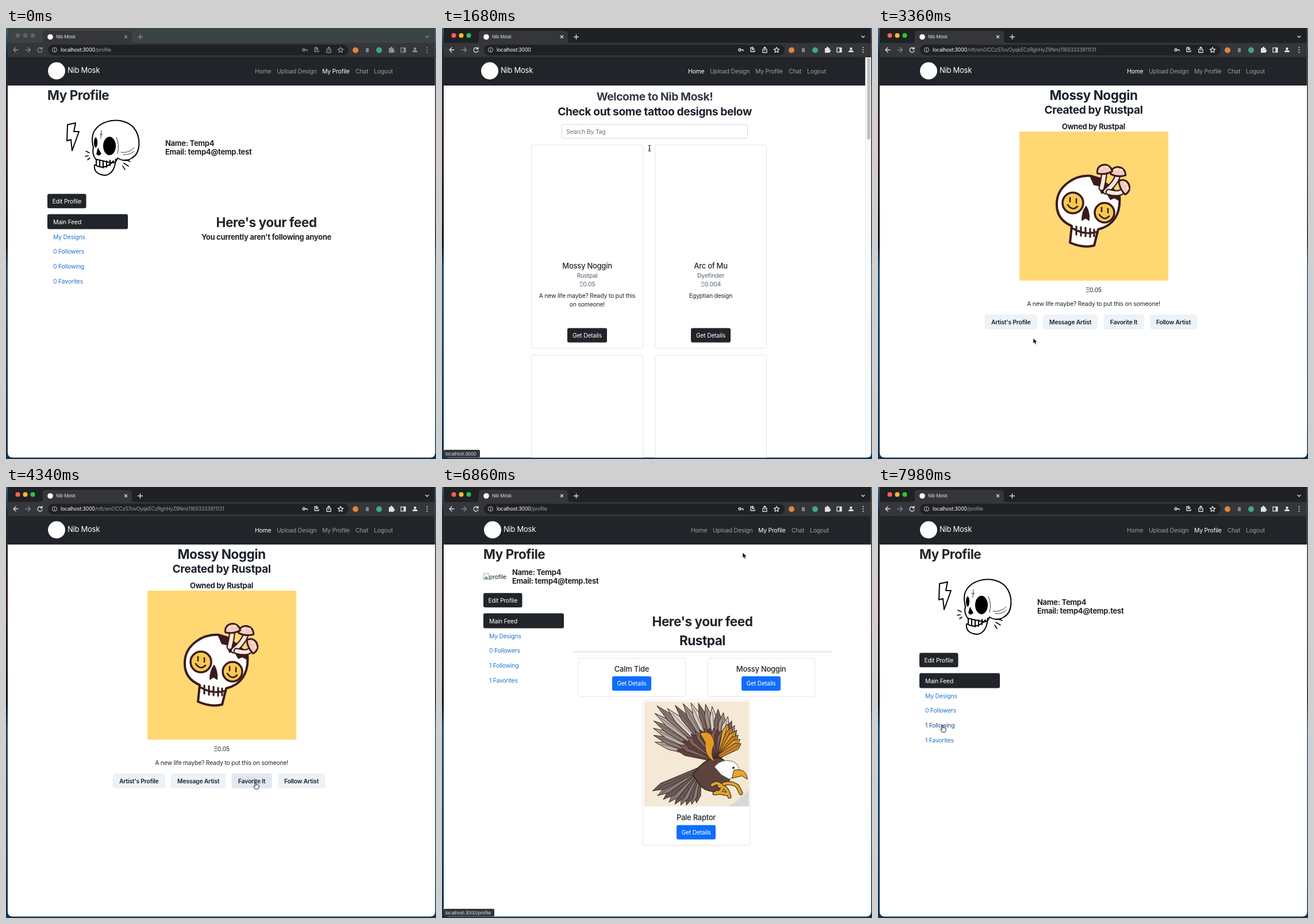
Animation, 748 px wide and 749 px high, one loop 8000 ms. Source, as an HTML page:

```html
<!DOCTYPE html>
<html lang="en">
<head>
<meta charset="utf-8">
<title>Nib Mosk</title>
<style>
  html, body { margin: 0; width: 100%; height: 100%; overflow: hidden; background: #fff; }
  svg { display: block; width: 748px; height: 749px; font-family: Inter, "Open Sans", sans-serif; }
  text { letter-spacing: -.02em; white-space: pre; }
</style>
</head>
<body>
<svg id="stage" viewBox="0 0 748 749"></svg>
<script>
const LOOP = 8000, STEP = 70;
const BRAND = 'Nib Mosk', ARTIST = 'Rustpal', DESIGN = 'Mossy Noggin';
const DARK = '#212529', INK = '#1a202c', BLUE = '#0d6efd';
const H1 = 22.5, H2 = 19.2, H3 = 12.9, BODY = 10.4;
const stage = document.getElementById('stage');

// Drawing helpers
const text = (x, y, size, str, fill = DARK, weight = 400, anchor = 'start') =>
  `<text x="${x}" y="${y}" font-size="${size}" fill="${fill}" font-weight="${weight}" text-anchor="${anchor}">${str}</text>`;
const mid = (x, y, size, str, fill = DARK, weight = 400) => text(x, y, size, str, fill, weight, 'middle');
const rect = (x, y, w, h, fill, r = 0, more = '') =>
  `<rect x="${x}" y="${y}" width="${w}" height="${h}" fill="${fill}" rx="${r}" ${more}/>`;
const dot = (x, y, r, fill, more = '') => `<circle cx="${x}" cy="${y}" r="${r}" fill="${fill}" ${more}/>`;
const path = (d, fill = 'none', stroke = 'none', width = 1) =>
  `<path d="${d}" fill="${fill}" stroke="${stroke}" stroke-width="${width}" fill-rule="evenodd" stroke-linecap="round" stroke-linejoin="round"/>`;
const group = (transform, body) => `<g transform="${transform}">${body}</g>`;
const button = (x, y, w, label, fill = DARK) => rect(x, y, w, 25, fill, 3) + mid(x + w / 2, y + 16.3, BODY, label, '#fff');
const card = (x, y, w, h) => rect(x, y, w, h, '#fff', 2.5, 'stroke="#dfdfdf" stroke-width=".8"');
const clamp = v => Math.max(0, Math.min(1, v));
const ramp = (t, from, to) => clamp((t - from) / (to - from));

// Artwork
function mushroomSkull(x, y, size) {
  const line = '#3b1b1d';
  const smiley = (cx, cy, r) => dot(cx, cy, r, '#f6c94f', `stroke="${line}" stroke-width="3.5"`) +
    path(`M${cx - 5} ${cy - 9}v7M${cx + 6} ${cy - 7}v7M${cx - 9} ${cy + 3}q8 12 17 3`, 'none', line, 2.6);
  const mushroom = (cx, cy, turn, stem) => path(`M${cx} ${cy}Q${cx - 1} ${cy + 16} ${stem}`, 'none', line, 11) +
    path(`M${cx} ${cy}Q${cx - 1} ${cy + 16} ${stem}`, 'none', '#fbeadd', 6.5) +
    group(`translate(${cx} ${cy}) rotate(${turn})`,
      path('M-13 4C-14 -14 12 -14 13 4Q0 9 -13 4Z', '#f4cbb8', line, 3) + path('M-5 -4h1M4 -5h2', 'none', '#fff0e4', 3));
  return group(`translate(${x} ${y}) scale(${size / 259})`, rect(0, 0, 259, 259, '#ffd873', 2) +
    path('M65 124C66 94 97 75 124 77L140 82L174 111C177 145 162 164 137 170L130 198Q111 203 88 193L91 164C72 156 64 143 65 124Z', '#fff', line, 4) +
    path('M122 77L142 83L158 93L174 108L174 121L165 116L158 119L151 107L142 108L138 95L129 93Z', line) +
    mushroom(172, 71, 5, '150 104') + mushroom(148, 67, -8, '143 98') + mushroom(182, 96, 65, '155 105') +
    smiley(93, 124, 18) + smiley(148, 141, 17) +
    path('M116 130Q122 140 121 154L115 150L109 154Q109 139 116 130Z', line, line, 2) +
    path('M92 168Q114 181 136 174M99 165v14M107 166v15M115 167v15M123 169v14M130 170v12', 'none', line, 3.2));
}

const ancientEye =
  path('M384 243Q384 239 390 239C424 237 436 218 464 218C500 218 524 239 549 244L550 257C515 248 492 234 463 234C432 235 420 257 388 258Q384 258 384 254Z', '#000') +
  path('M387 274Q425 246 466 246Q508 248 553 266Q546 277 530 284Q505 306 470 306Q420 302 387 274ZM404 275Q434 256 466 255Q502 257 527 270Q500 295 468 297Q430 295 404 275Z', '#000') +
  dot(468, 272, 16, '#000') +
  path('M516 296C492 350 432 382 402 366C378 350 380 320 401 317C418 316 418 338 403 338', 'none', '#000', 8) +
  path('M533 288C519 331 497 336 504 388C514 354 533 340 541 318Q532 320 522 325Q534 306 533 288Z', '#000');

function luckyCards() {
  const playing = (x, y, turn, color, glyph) => group(`translate(${x} ${y}) rotate(${turn})`,
    rect(-23, -36, 46, 72, '#f3dfb0', 2, 'stroke="#2a1810" stroke-width="2.5"') + mid(0, 13, 38, glyph, color));
  const banner = [...'LUCKY'].map((letter, i) =>
    group(`translate(${209 + 24.5 * i} ${724 - 3 * (i - 2) ** 2}) rotate(${(2 - i) * 8})`, mid(0, 0, 32, letter, '#21140f', 500))).join('');
  return playing(212, 654, 0, '#16100f', '♠') + playing(238, 618, -32, '#a3161c', '♥') +
    playing(269, 636, 6, '#16100f', '♣') + playing(300, 658, 20, '#a3161c', '♦') +
    path('M157 735L170 712L168 684L195 696L205 720L214 746H160ZM316 690L330 672L333 686L349 688L335 708L343 725L318 736Z', '#2b211c') +
    [-70, -35, 0, 35, 70].map(a => group(`rotate(${a} 237 742)`,
      path('M237 744C212 728 219 708 237 710C255 708 262 728 237 744Z', a % 70 ? '#b9431d' : '#dd8b34', '#2b140d', 3))).join('') +
    path('M189 690Q188 672 204 676Q256 708 312 674Q328 670 328 684L326 708Q262 750 202 716Q190 708 189 690Z', '#ecd09a', '#2a1810', 2.5) +
    banner;
}

function nomadHorse() {
  const curls = [[402, 610], [427, 591], [458, 582], [486, 588], [509, 598], [522, 621]];
  return path('M388 660C376 622 400 606 426 604C462 590 508 604 514 624C496 634 478 646 464 662L450 646L425 632Q404 634 388 660Z', '#26322b') +
    curls.map(([x, y]) => path(`M455 628Q${x + 4} ${y + 26} ${x} ${y}`, 'none', '#26322b', 9) +
      [-6, 0, 6].map(d => dot(x + d, y - 5 + Math.abs(d) / 2, 3.5, '#fff', 'stroke="#26322b" stroke-width="1.8"')).join('')).join('') +
    path('M391 666Q393 638 424 638L443 660C475 647 500 640 516 660C550 678 530 713 488 706Q462 704 448 694Q432 712 442 745M391 666Q378 678 384 686Q398 688 416 670Q414 700 430 713L382 700L374 714L420 732L426 745M470 655Q450 635 475 630L540 642L548 622L556 632L550 650L500 660M524 700Q540 720 500 726Q470 728 472 745', 'none', '#27312c', 1.8) +
    path('M548 622L557 624L552 640L539 639Z', '#26322b') +
    path('M424 650Q452 660 440 700M430 647Q460 668 448 694M417 664Q435 676 430 700', 'none', '#27312c', 4) +
    dot(411, 654, 3, '#fff', 'stroke="#27312c" stroke-width="1.5"') +
    path('M510 706q18 -14 30 2q10 22 -8 22q-12 -4 -4 -14M522 745q20 -4 29 -20', 'none', '#27312c', 2);
}

function raptor() {
  // Feathers spread from one joint, their length running from `first` to `last`
  const fan = (x, y, from, to, count, first, last, tints) => Array.from({ length: count }, (_, i) => {
    const k = i / (count - 1), length = first + (last - first) * k;
    return group(`translate(${x} ${y}) rotate(${from + (to - from) * k})`,
      path(`M0 3L${length * .8} 6L${length} 0L${length * .78} -6L0 -3Z`, tints[i % tints.length], '#3a2724', 1) +
      path(`M0 0H${length * .9}`, 'none', '#4a3430', .7));
  }).join('');
  const claws = 'M470 518q10 -8 18 4q-4 12 -14 10M490 516q14 -4 24 4l6 12M482 520q14 0 18 18M478 530l20 4';
  return rect(352, 373, 182, 182, '#f3e9d5') +
    fan(478, 474, 196, 222, 6, 112, 140, ['#b9aea5', '#8d7a74']) +
    fan(478, 474, 226, 304, 13, 124, 62, ['#d8cfc4', '#7d6763', '#a3958c']) +
    fan(480, 475, 194, 300, 15, 74, 46, ['#65403f', '#7f6560']) +
    fan(482, 468, 285, 330, 6, 58, 44, ['#e0a12f', '#c98522']) +
    fan(448, 490, 95, 155, 9, 59, 90, ['#6a5a58', '#8b7d79']) +
    path('M436 500C450 480 470 464 490 474L502 506C490 530 468 536 450 520Z', '#5c4340', '#32211f', 1.5) +
    path('M449 428Q470 420 474 446Q464 466 476 478Q456 470 458 444Z', '#e09a24', '#4a2a16', 1) +
    path('M474 486Q487 471 506 477Q520 484 516 498L500 508L486 500Z', '#fff', '#6c625a', 1) +
    path('M508 492Q530 488 531 508L522 502L505 506Z', '#e5a62c', '#3b2417', 1) + dot(507, 488, 2, '#332017') +
    path(claws, 'none', '#4a2a16', 7) + path(claws, 'none', '#e2a42f', 4.5) +
    path('M498 555Q512 548 519 540L534 527V555Z', '#d9d8d6');
}

const portrait =
  path('M107 168L121 165L118 180L127 180L115 213L113 194L106 196Z', 'none', '#000', 2) +
  path('M152 208Q147 187 155 177C168 158 205 154 222 173C236 190 234 218 219 226Q207 234 194 226Q191 236 182 234L156 228Q149 218 152 208Z', '#fff', '#000', 2) +
  '<ellipse cx="180" cy="205" rx="11" ry="16"/><ellipse cx="156" cy="199" rx="3" ry="9"/>' +
  path('M160 208L166 219L161 222L157 219Z', '#000') +
  path('M154 238Q152 254 172 256Q189 254 191 228M155 238Q172 248 187 231M157 229v8M163 230v11M169 231v12M175 231v11M181 230v9', 'none', '#000', 2) +
  path('M139 214l6 3M138 223l5 -1M142 229l4 -3M207 229l9 3M205 235l8 5M203 240l4 6', 'none', '#000', 1.6) +
  path('M166 178l-1 14M163 185h5M200 216q14 2 23 -8M204 220q12 1 19 -6M192 190q6 14 2 28', 'none', '#000', .8);

// Browser window
function chrome(active, host, rest) {
  const icon = active ? '#dfe1e5' : '#8d9093';
  const stroke = d => path(d, 'none', icon, 1.3);
  const lights = active ? ['#fe5f57', '#febc2e', '#28c840'] : Array(3).fill('#5d6264');
  return rect(0, 0, 748, 749, 'url(#desk)') + rect(3, -8, 743.5, 754.5, '#fff', 8) +
    rect(3, 0, 743.5, 27, active ? '#202124' : '#3b4344') + rect(3, 26, 743.5, 25, '#35363a') +
    path('M58 27Q64 27 64 20V10Q64 5 69 5H213Q219 5 219 11V20Q219 27 225 27Z', '#35363a') +
    lights.map((c, i) => dot(20.5 + 13 * i, 13, 4, c)).join('') +
    dot(77, 15.5, 4.8, '#fff') + text(87, 18.4, 7.9, BRAND, '#dfe1e5') +
    stroke('M206.5 13.3l4 4m0 -4l-4 4M229.5 15.5h8m-4 -4v8M730 14l2.5 2.5l2.5 -2.5') +
    rect(73, 29, 523, 18.5, '#202124', 9) +
    stroke('M21 38H13.5m3.5 -4l-4 4l4 4') +
    path('M34 38h8m-3.5 -4l4 4l-4 4', 'none', '#85888b', 1.3) +
    stroke('M62.5 36a4 4 0 1 0 .5 3.5M63 33.5v3h-3') +
    path('M84.5 37.5v3M84.5 35.5v.1', 'none', '#bdc1c6') + dot(84.5, 38, 4, 'none', 'stroke="#bdc1c6"') +
    text(95, 41.3, 8.8, `<tspan fill="#fff">${host}</tspan>${rest}`, '#9aa0a6') +
    dot(518, 38, 1.9, 'none', `stroke="${icon}" stroke-width="1.5"`) + stroke('M520 38h4v2') +
    stroke('M540 34h-3v7h7v-2M541 33v5m-2 -2l2 2l2 -2M559.5 37h-1.5v5.5h7v-5.5h-1.5M561.5 39v-6m-2 2l2 -2l2 2') +
    stroke('M582 33.5l1.4 3l3.2 .4l-2.4 2.2l.7 3.3l-2.9 -1.7l-2.9 1.7l.7 -3.3l-2.4 -2.2l3.2 -.4Z') +
    dot(608, 38.5, 5, '#e8833a') + rect(626, 35, 5, 7, '#85888b') + dot(649, 38.5, 5, '#42a884') +
    path('M666 35h2.5q0 -2.5 2 -2.5t2 2.5h2v3q2 0 2 1.7t-2 1.7v1.6h-8.5Z', icon) +
    rect(687, 34.5, 8, 7.5, 'none', 0, `stroke="${icon}" stroke-width="1.3"`) + rect(691.5, 34.5, 3.5, 7.5, icon) +
    dot(711.5, 36, 2.2, icon) + path('M707 42q0 -3.5 4.5 -3.5t4.5 3.5Z', icon) +
    [34, 38, 42].map(y => dot(732.5, y, 1.1, icon)).join('');
}

// `lit` maps a link label to its opacity
function navbar(shift, lit) {
  const links = [['Home', 433], ['Upload Design', 471], ['My Profile', 550], ['Chat', 608], ['Logout', 640]];
  return rect(3, 50.5, 743.5, 49.5, DARK) + group(`translate(${shift})`,
    dot(88, 74.5, 15, '#fff') + text(107, 78.2, 13, BRAND, '#fff') +
    links.map(([label, x]) => text(x, 79, BODY, label, `rgba(255,255,255,${lit[label] || .55})`)).join(''));
}

const scrollbar = height => rect(736.5, 51, 10, 695, '#fafafa') + path('M736.5 51V746', 'none', '#e4e4e4', .7) +
  rect(739.5, 52, 5.5, height, '#c1c1c1', 2.7);
const statusBar = (label, width) => rect(3, 733, width, 13.5, '#35363a', 2) + text(6, 742.5, 7.9, label, '#e2e3e5');

// Pages
function profilePage({ loaded, count, feed, shift = 0, hover }) {
  const drop = loaded ? 104 : 0, picture = loaded ? 186 : 0;
  const nameX = loaded ? 277 : 122, nameY = loaded ? 205 : 153;
  const links = ['My Designs', '0 Followers', `${count} Following`, `${count} Favorites`];
  const heading = mid(453, 242, H1, "Here's your feed", DARK, 700);
  const small = (x, title, art) => card(x, 297.5, 186.5, 67 + picture) + art +
    mid(x + 93, 320.5 + picture, 13, title, DARK, 500) + button(x + 59, 329 + picture, 68, 'Get Details', BLUE);
  const artworks = heading + mid(453, 275, H1, ARTIST, INK, 700) + path('M228 286.5H679', 'none', '#cfcfcf') +
    small(237, 'Calm Tide', loaded ? rect(239, 300, 182, 182, '#efe6d6') : '') +
    small(462, DESIGN, loaded ? mushroomSkull(464, 300, 182) : '') +
    group(`translate(0 ${picture})`, card(349.5, 370.5, 186.5, 252) + raptor() +
      mid(442, 579, 13, 'Pale Raptor', DARK, 500) + button(408, 587.5, 68, 'Get Details', BLUE));
  const feeds = {
    empty: heading + mid(453, 264.3, H3, "You currently aren't following anyone", DARK, 700),
    full: artworks, none: ''
  };
  const broken = rect(72.5, 150, 9, 11, '#eef2f6', 0, 'stroke="#9aa4ad" stroke-width=".8"') +
    path('M73 160l4 -5l4 5Z', '#59a65b') + text(82, 160, BODY, 'profile');
  return group(`translate(${shift})`,
    text(72, 125, H1, 'My Profile', DARK, 700) + (loaded ? portrait : broken) +
    text(nameX, nameY, H3, 'Name: Temp4', DARK, 700) + text(nameX, nameY + 15.4, H3, 'Email: temp4@temp.test', DARK, 700) +
    group(`translate(0 ${drop})`, button(72, 184.3, 67.5, 'Edit Profile') +
      rect(72, 219.5, 140, 26, DARK, 3) + text(82, 236.5, BODY, 'Main Feed', '#fff') +
      links.map((l, i) => text(82, 262.5 + 25.9 * i, BODY, l, hover && i === 2 ? '#1c4f86' : '#2276cb')).join('') +
      feeds[feed]));
}

function homePage(t) {
  const grow = 1 - (1 - ramp(t, 1330, 2170)) ** 2;
  const images = t >= 1820;
  const tile = (x, title, artist, price, lines) => card(x, 203, 194, 353.5) +
    mid(x + 97, 418.3, 13, title, DARK, 500) + mid(x + 97, 434, BODY, artist, '#6c757d', 500) +
    mid(x + 97, 449, BODY, price, '#6c757d', 500) +
    lines.map((l, i) => mid(x + 97, 468.5 + 15.6 * i, BODY, l)).join('') +
    button(x + 62.5, 521.5, 69, 'Get Details') + card(x, 568.5, 194, 300);
  return `<g transform="translate(370 119) scale(${grow})" opacity="${clamp(grow * 1.35)}">` +
    mid(0, 10, 29.2, 'Welcome to ' + BRAND + '!', INK, 700) + '</g>' +
    mid(370, 152.3, H2, 'Check out some tattoo designs below', INK, 700) +
    rect(208.5, 167.5, 323, 24, '#fff', 2.5, 'stroke="#ced4da" stroke-width=".9"') + text(216, 183.5, BODY, 'Search By Tag', '#6c757d') +
    tile(155.5, DESIGN, ARTIST, 'Ξ0.05', ['A new life maybe? Ready to put this', 'on someone!']) +
    tile(370.5, 'Arc of Mu', 'Dyefinder', 'Ξ0.004', ['Egyptian design']) +
    (images ? mushroomSkull(155.5, 203, 193.5) + ancientEye + luckyCards() + nomadHorse() : '');
}

function detailPage(t) {
  const favored = t >= 4550, followed = t >= 5110;
  const focus = followed ? 3 : favored ? 2 : -1;
  const hover = t < 3900 ? -1 : t < 4620 ? 2 : t >= 4760 && t < 5530 ? 3 : -1;
  const buttons = [["Artist's Profile", 91], ['Message Artist', 95],
    favored ? ['Unfavorite', 72] : ['Favorite It', 70], followed ? ['Unfollow Artist', 95] : ['Follow Artist', 82]];
  let x = 370.3 - (buttons.reduce((sum, b) => sum + b[1], 0) + 31.2) / 2;
  const row = buttons.map(([label, w], i) => {
    const ring = i === focus ? 'stroke="#8fc0ec" stroke-width="2"' : '';
    const body = rect(x, 497.8, w, 26, i === hover ? '#e2e8f0' : '#edf2f7', 4, ring) + mid(x + w / 2, 514.5, BODY, label, INK, 600);
    x += w + 10.4;
    return body;
  }).join('');
  return mid(375, 125, H1, DESIGN, INK, 700) + mid(375, 149, H2, 'Created by ' + ARTIST, INK, 700) +
    mid(375, 176, H3, 'Owned by ' + ARTIST, INK, 700) + mushroomSkull(246, 180, 259) +
    mid(375, 458.5, BODY, 'Ξ0.05') + mid(375, 483.3, BODY, 'A new life maybe? Ready to put this on someone!') + row;
}

// Pointer
const route = [[140, 610, 330], [840, 449, 76], [1260, 449, 76], [1680, 361, 209], [2310, 297, 487], [2870, 404, 674],
  [3150, 270, 539], [3360, 270, 539], [4060, 448, 513], [4130, 445, 513], [4200, 445, 513], [4340, 434, 513], [4480, 434, 513],
  [4900, 513, 513], [5460, 513, 513], [6020, 572, 116], [6230, 576, 76], [6510, 576, 76], [6860, 523, 114], [7700, 112, 414]];
const shapes = [[0, 'arrow'], [800, 'hand'], [1330, 'arrow'], [1610, 'beam'], [1800, 'arrow'], [3080, 'hand'], [3360, 'arrow'],
  [3900, 'hand'], [4620, 'arrow'], [4760, 'hand'], [5530, 'arrow'], [6200, 'hand'], [6580, 'arrow'], [7630, 'hand']];
const pointers = {
  arrow: path('M0 0V9.5L2.2 7.5L3.7 11L5.5 10.2L4 6.9H7Z', '#000', '#fff', .7),
  hand: path('M-1 7V1Q0 -.8 1 1V4.5Q2 3.5 3 4.7Q4 4 4.8 5.2Q6.3 4.8 6.3 6.5Q6.3 9.5 4.5 12H-.5Q-2 9 -3.5 7.5Q-3.5 5.5 -1 7Z', '#fff', '#000', .9),
  beam: path('M-2 -5Q0 -5 0 -4Q0 -5 2 -5M0 -4V4M-2 5Q0 5 0 4Q0 5 2 5M-1 1H1', 'none', '#000', 1)
};
function pointer(t) {
  if (t < route[0][0]) return '';
  const next = route.findIndex(k => k[0] > t);
  const b = next < 0 ? route[route.length - 1] : route[next];
  const a = next < 0 ? b : route[next - 1];
  let p = ramp(t, a[0], b[0]) || 0;
  p = p * p * (3 - 2 * p);
  const shape = shapes.filter(s => s[0] <= t).pop()[1];
  return group(`translate(${a[1] + (b[1] - a[1]) * p} ${a[2] + (b[2] - a[2]) * p})`, pointers[shape]);
}

const defs = `<defs><linearGradient id="desk" x2="0" y2="1"><stop stop-color="#3e6380"/><stop offset=".06" stop-color="#172b3c"/>
  <stop offset=".25" stop-color="#38201e"/><stop offset=".5" stop-color="#11151a"/><stop offset=".56" stop-color="#1c4c70"/>
  <stop offset="1" stop-color="#12324d"/></linearGradient>
  <clipPath id="view"><path d="M3 0H746.5V740Q746.5 746.5 740 746.5H9Q3 746.5 3 740Z"/></clipPath></defs>`;

function picture(t) {
  let page, shift = 0, bar = '', rest = '', lit, status = '';
  if (t < 1330) {
    rest = '/profile';
    lit = { 'My Profile': 1, Home: .55 + .2 * ramp(t, 910, 1120) };
    page = profilePage({ loaded: true, count: 0, feed: 'empty' });
    if (t >= 840) status = statusBar('localhost:3000', 63);
  } else if (t < 3360) {
    shift = -5;
    bar = scrollbar(142);
    lit = { Home: 1 };
    page = homePage(t);
    if (t < 2170) status = statusBar('localhost:3000', 63);
  } else if (t < 6580) {
    rest = '/nft/xmOCCzS7ovOyqkECzRghHyZ9Nmi11653333911131';
    lit = { Home: 1, 'My Profile': .55 + .2 * ramp(t, 6230, 6370) };
    page = detailPage(t);
  } else {
    const loaded = t >= 7000, listed = t < 7840;
    rest = '/profile';
    if (loaded && listed) {
      shift = -5;
      bar = scrollbar(485);
    }
    lit = { 'My Profile': 1 };
    page = profilePage({ loaded, count: 1, feed: listed ? 'full' : 'none', shift, hover: t >= 7630 });
    if (t < 7420) status = statusBar('localhost:3000/profile', 88);
  }
  return defs + chrome(t >= 140, 'localhost:3000', rest) +
    `<g clip-path="url(#view)">${page}${navbar(shift, lit)}${bar}${status}</g>` + pointer(t);
}

let shown = -1;
function tick(now) {
  const t = Math.floor(now % LOOP / STEP) * STEP;
  if (t !== shown) stage.innerHTML = picture(shown = t);
  requestAnimationFrame(tick);
}
tick(0);
</script>
</body>
</html>
```
